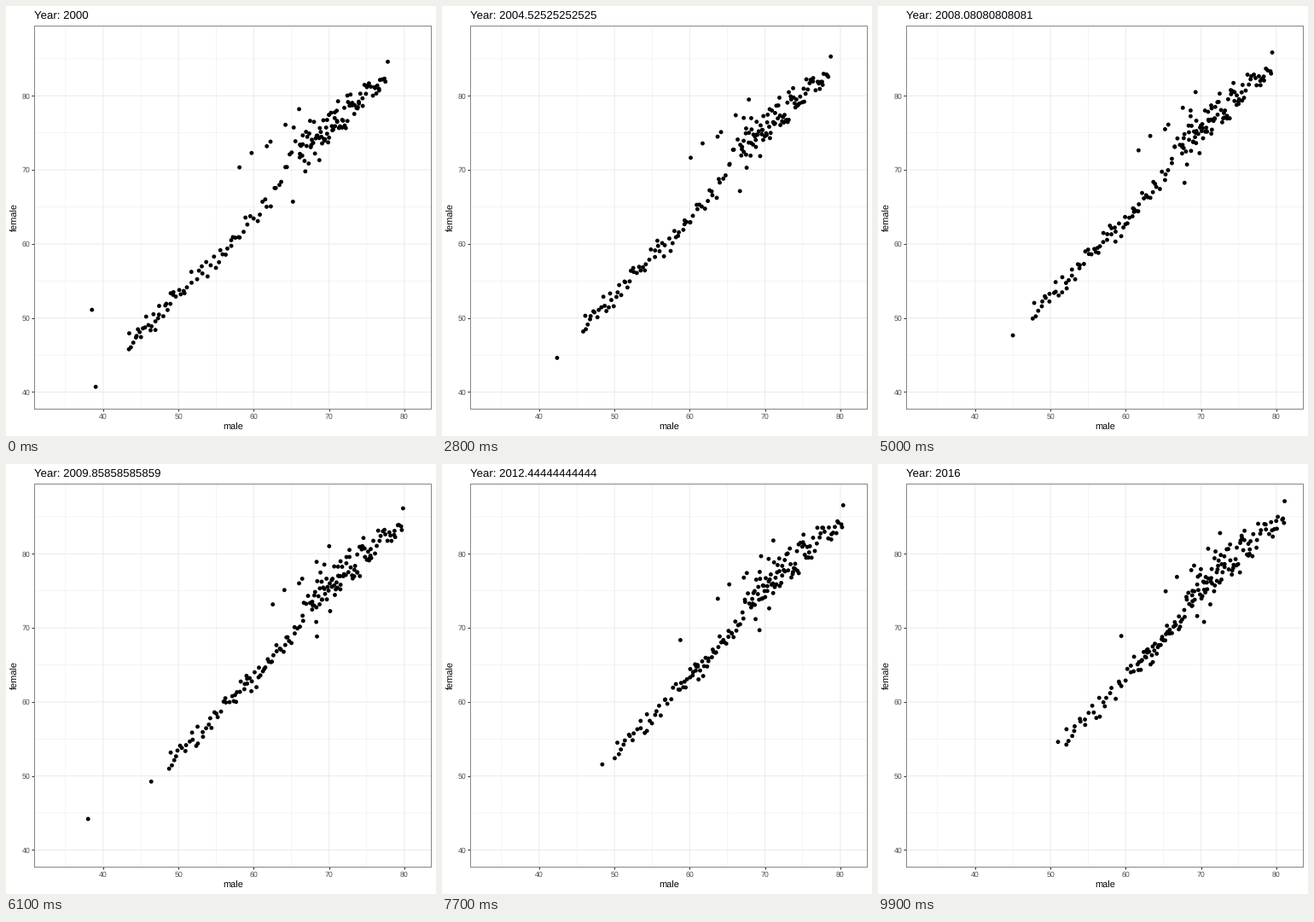
A matplotlib script for the animation above (10 s loop, 504x504 px).

```python
import numpy as np
import matplotlib.pyplot as plt
from matplotlib.animation import FuncAnimation

SIZE, FRAMES, INTERVAL = 504, 100, 100
START, SPAN = 2000, 16
CROWD = 170
INK, FRAME, GRID, LABEL = "#333333", "#858585", "#ebebeb", "#4d4d4d"

plt.rcParams["font.family"] = "Liberation Sans"
plt.rcParams["text.hinting"] = "none"
rng = np.random.default_rng(5)
years = np.arange(SPAN + 1)
keys = np.round(years * (FRAMES - 1) / SPAN)

# Countries that leave the crowd, as (year, male, female) waypoints
journeys = [
    [(0, 39, 40.7), (16, 51, 54.6)],
    [(0, 65.2, 65.7), (16, 70.4, 70.8)],
    [(0, 77.8, 84.6), (16, 81.1, 87.1)],
    [(0, 38.5, 51.1), (1, 53.5, 58.4), (16, 62.9, 67.1)],
    [(0, 57, 60.5), (9, 61.6, 64.8), (10, 33.27, 40.07), (11, 61, 64.5), (16, 61.1, 66.1)],
    [(0, 70.8, 75.9), (10, 71.5, 77), (12, 60.5, 69.4), (13, 57, 67.3), (16, 59.4, 68.9)],
]

# Male life expectancy by rank, first and last year
RANK = [0, .18, .35, .45, .68, .88, 1]
FIRST = [43.2, 50, 59.5, 66, 70, 74, 77.6]
LAST = [51.7, 61.5, 65.7, 68.5, 72.6, 76.8, 81.2]


def drift(a, b):
    """Even motion from a to b over the years."""
    return a + (b - a) * (years / SPAN)[:, None, None]


def journey(points):
    t, male, female = zip(*points)
    return np.column_stack([np.interp(years, t, male), np.interp(years, t, female)])


def stragglers(n=7):
    """Lands where women far outlive men, spread along a line."""
    a = np.linspace((58.5, 71), (66.5, 77.4), n)
    b = np.linspace((65.7, 75.6), (73, 82), n)
    return drift(a, b) + rng.normal(0, .5, (n, 2))


def cloud(male, centre, rise, noise):
    """The lead of women grows around a centre, and scatters most just above it."""
    step = 1 / (1 + np.exp(-(male - centre) / 1.5))
    bump = np.exp(-((male - centre - 5) / 5) ** 2)
    gap = 3 + rise * step + bump
    return np.column_stack([male, male + gap + (.7 + 1.1 * bump) * noise])


def crowd():
    u = (np.arange(CROWD) + rng.uniform(0, 1, CROWD)) / CROWD
    na = rng.normal(size=CROWD).clip(-2, 2)
    nb = (.85 * na + .5 * rng.normal(size=CROWD)).clip(-2, 2)
    a = cloud(np.interp(u, RANK, FIRST), 62, 2.2, na)
    b = cloud(np.interp(u, RANK, LAST), 67, 1.4, nb)
    return drift(a, b) + rng.normal(0, .08, (SPAN + 1, CROWD, 2))


yearly = np.concatenate(
    [np.stack([journey(j) for j in journeys], axis=1), stragglers(), crowd()], axis=1)


def positions(i):
    k = min(np.searchsorted(keys, i, side="right") - 1, SPAN - 1)
    t = (i - keys[k]) / (keys[k + 1] - keys[k])
    return yearly[k] + (yearly[k + 1] - yearly[k]) * t


def label(x, y, text, size, **kw):
    return fig.text(x / SIZE, 1 - y / SIZE, text, fontsize=size, va="baseline", **kw)


fig = plt.figure(figsize=(SIZE / 72, SIZE / 72), dpi=72, facecolor="white")
left, right, top, bottom = 33.4, 498.4, 23.4, 472.4
ax = fig.add_axes([left / SIZE, 1 - bottom / SIZE,
                   (right - left) / SIZE, (bottom - top) / SIZE])
ax.set_xlim(30.87, 83.57)
ax.set_ylim(37.7, 89.43)
ax.set_xticks(range(40, 81, 10))
ax.set_yticks(range(40, 81, 10))
ax.set_xticks(range(35, 76, 10), minor=True)
ax.set_yticks(range(45, 86, 10), minor=True)
ax.set_axisbelow(True)
ax.grid(which="major", color=GRID, linewidth=1.07)
ax.grid(which="minor", color=GRID, linewidth=.53)
ax.tick_params(which="major", length=3, width=1.07, pad=2.2,
               color=INK, labelcolor=LABEL, labelsize=8.8)
ax.tick_params(which="minor", length=0)
for axis in (ax.xaxis, ax.yaxis):
    for tick in axis.get_major_ticks() + axis.get_minor_ticks():
        tick.gridline.set_snap(False)
for spine in ax.spines.values():
    spine.set(color=FRAME, linewidth=1)

label((left + right) / 2, 497, "male", 11, ha="center")
label(13.4, (top + bottom) / 2, "female", 11, ha="center",
      rotation=90, rotation_mode="anchor")
title = label(33, 15, "", 13.2)

count = yearly.shape[1]
dots = ax.scatter(*yearly[0].T, s=4.85 ** 2, c=["black"] * count, linewidths=0, zorder=2)


def draw(i):
    dots.set_offsets(positions(i))
    title.set_text(f"Year: {START + SPAN * i / (FRAMES - 1):.15g}")
    return dots, title


anim = FuncAnimation(fig, draw, frames=FRAMES, interval=INTERVAL, repeat=True, repeat_delay=0)
plt.show()
```
